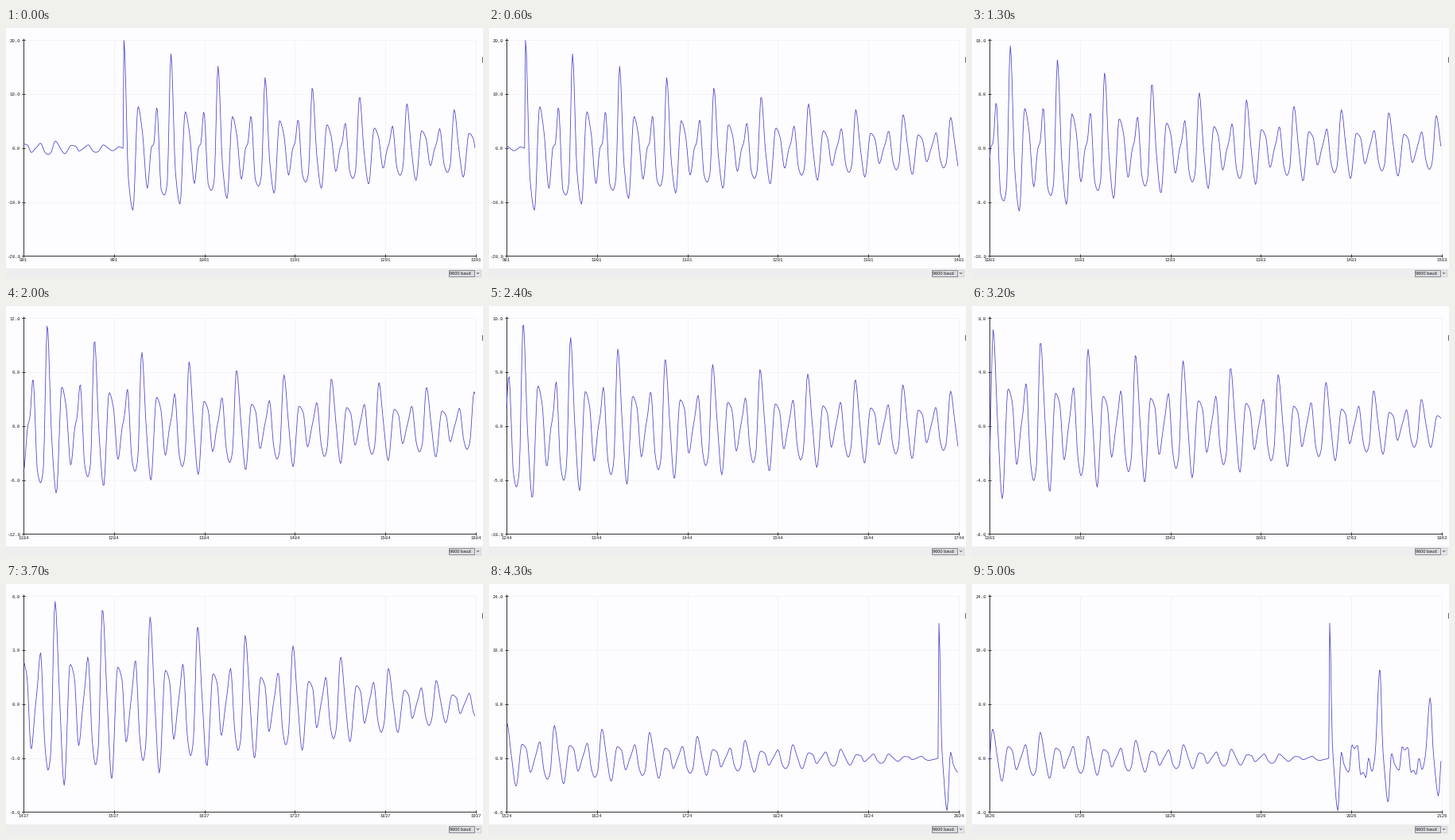
These frames come from a looping animation (600x314 px, 5100 ms). A matplotlib script:

```python
import numpy as np
import matplotlib.pyplot as plt
from matplotlib.animation import FuncAnimation
from matplotlib.patches import Rectangle

W, H, DPI = 600, 314, 100
FRAMES, INTERVAL = 51, 100
LEFT, RIGHT, TOP, BOTTOM = 22, 591, 15.4, 286.4
SPAN = 500                      # samples across the plot
STEP = (RIGHT - LEFT) / SPAN
PT = 72 / DPI                   # points per pixel
INK, BLUE, GRID = "#333333", "#4a44cb", "#f4f3f6"
FIRST, LAST = 891, 2127         # sample range in use

# One cycle of the ringing: offset, part that dies out early, lasting part
CYCLE = [(0, 12.4, 7.6), (5, -6.3, .6), (10, -5.5, -6), (15.6, 4.8, 2.95),
         (20.3, 1.2, 2), (25.9, -4.4, -3.07), (30.5, .6, -.35), (33, -.5, 1.25),
         (36.4, 4.2, 3.5), (41.3, -5, -2.8), (44.8, -4.2, -4.5),
         (47.8, -3.3, -3.3)]

# One cycle of the restless last hit: offset, height
RATTLE = [(0, 20), (2.9, 2.5), (4.7, -1.6), (9, -7.8), (12.8, .9), (16, -1),
          (21.2, -2.1), (24.6, 2), (27.3, 1.4), (30.8, 1.9), (34.3, -2.5),
          (37, -2.1), (40, -2.9), (43, 0), (46.6, -2), (50, .2)]


def ringing(hit, end):
    """Knots of a hit that rings out over nineteen cycles."""
    knots = [(hit - 1, 0)]
    for k in range(19):
        start = hit + 51.95 * k + .028 * k * k
        strike = max(0, 1 - k / 9) ** 1.9
        ring = 1 - (k / 18.8) ** 1.9
        for off, early, late in CYCLE:
            drift = 2.5 * k / 18 * np.exp(-((off - 18) / 6) ** 2)
            knots.append((start + off + drift, early * strike + late * ring))
    return [p for p in knots if p[0] < end - 2]


def rattling(hit):
    """Knots of a hit whose main peak fades faster than its ripple."""
    knots = [(hit - 1, 0)]
    for k in range(3):
        for off, height in RATTLE:
            fade = .85 if off else .67
            knots.append((hit + 55.6 * k + off, height * fade ** k))
    return knots


def monotone(x, y, at):
    """Monotone cubic interpolation."""
    h, d = np.diff(x), np.diff(y) / np.diff(x)
    m = np.zeros_like(y)
    same = d[:-1] * d[1:] > 0
    a, b = d[:-1][same], d[1:][same]
    m[1:-1][same] = 2 * a * b / (a + b)
    i = np.clip(np.searchsorted(x, at, side="right") - 1, 0, len(h) - 1)
    t = (at - x[i]) / h[i]
    return (y[i] * (1 + 2 * t) * (1 - t) ** 2 + y[i + 1] * t * t * (3 - 2 * t)
            + h[i] * t * (1 - t) * (m[i] * (1 - t) - m[i + 1] * t))


knots = np.array(ringing(35, 1002) + ringing(1002, 2002) + rattling(2002), float)
signal = monotone(knots[:, 0], knots[:, 1], np.arange(FIRST, LAST))


def window_start(frame):
    return int(np.interp(frame, [0, 6, 13, 20, 28, 37, 50],
                         [891, 981, 1083, 1184, 1305, 1437, 1626]) + 1e-6)


def scale(values):
    """Lowest tick, highest tick and tick step that hold the values."""
    low, high = values.min(), values.max()
    step = next(s for s in (1, 2, 3, 4, 5, 6, 8, 10, 20)
                if s >= (high - low) / 3.49)
    return (step * int(np.floor(low / step)),
            step * int(np.ceil(high / step - 1e-6)), step)


fig = plt.figure(figsize=(W / DPI, H / DPI), dpi=DPI, facecolor="#fdfcfe")
ax = fig.add_axes([0, 0, 1, 1])
ax.set_xlim(0, W)
ax.set_ylim(H, 0)
ax.axis("off")


def stroke(xs, ys, color=INK, width=1, **kw):
    return ax.plot(xs, ys, color=color, lw=width * PT,
                   solid_capstyle="butt", **kw)[0]


def label(x, y, ha, text="", font="Liberation Mono"):
    return ax.text(x, y, text, ha=ha, va="center_baseline", color="#1c1c1c",
                   fontsize=5.6 * PT, family=font, zorder=5)


def box(x, y, w, h, fill, edge="none"):
    ax.add_patch(Rectangle((x, y), w, h, fc=fill, ec=edge, lw=PT, zorder=3))


# Fixed parts
x_marks = LEFT + 100 * STEP * np.arange(6)
for x in x_marks[1:]:
    stroke([x, x], [TOP, BOTTOM], GRID, zorder=1)
for x in x_marks:
    stroke([x, x], [BOTTOM - 2, BOTTOM + 2])
stroke([LEFT, LEFT], [TOP - 2, BOTTOM + 1])
stroke([LEFT - 2, RIGHT], [BOTTOM, BOTTOM])
box(0, 302, W, 12, "#eeeeee")
box(557, 304, 40, 8, "#e6e6e8", "#d2d3d6")
box(557, 304, 32, 8, "#d9dbdf", "#8a8c92")
label(558.3, 307.9, "left", "9600 baud", "Liberation Sans")
stroke([592, 593.6, 595.2], [307, 308.8, 307], "#666666", .9, zorder=5)
stroke([599, 599], [36, 43], "#66666a")

# Moving parts
x_labels = [label(x, 290.6, "center") for x in x_marks]
y_labels = [label(17.9, 0, "right") for _ in range(6)]
y_ticks = [stroke([], []) for _ in range(6)]
y_grid = [stroke([], [], GRID, zorder=1) for _ in range(6)]
trace = stroke([], [], BLUE, .8, zorder=4, solid_joinstyle="round")
trace_x = LEFT + STEP * np.arange(SPAN)


def draw(frame):
    start = window_start(frame)
    values = signal[start - FIRST:start - FIRST + SPAN]
    low, high, step = scale(values)

    def to_y(v):
        return BOTTOM - (v - low) * (BOTTOM - TOP) / (high - low)

    for i, (text, tick, line) in enumerate(zip(y_labels, y_ticks, y_grid)):
        value = low + i * step
        for part in (text, tick, line):
            part.set_visible(value <= high)
        y = to_y(value)
        text.set_text(f"{value:.1f}")
        text.set_y(y + .2)
        tick.set_data([LEFT - 2, LEFT + 2], [y, y])
        line.set_data([LEFT, RIGHT], [y, y])

    for i, text in enumerate(x_labels):
        text.set_text(str(start + 100 * i))
    trace.set_data(trace_x, to_y(values))
    return [trace, *x_labels, *y_labels, *y_ticks, *y_grid]


anim = FuncAnimation(fig, draw, frames=FRAMES, interval=INTERVAL,
                     repeat=True, repeat_delay=0, blit=False)
plt.show()
```
